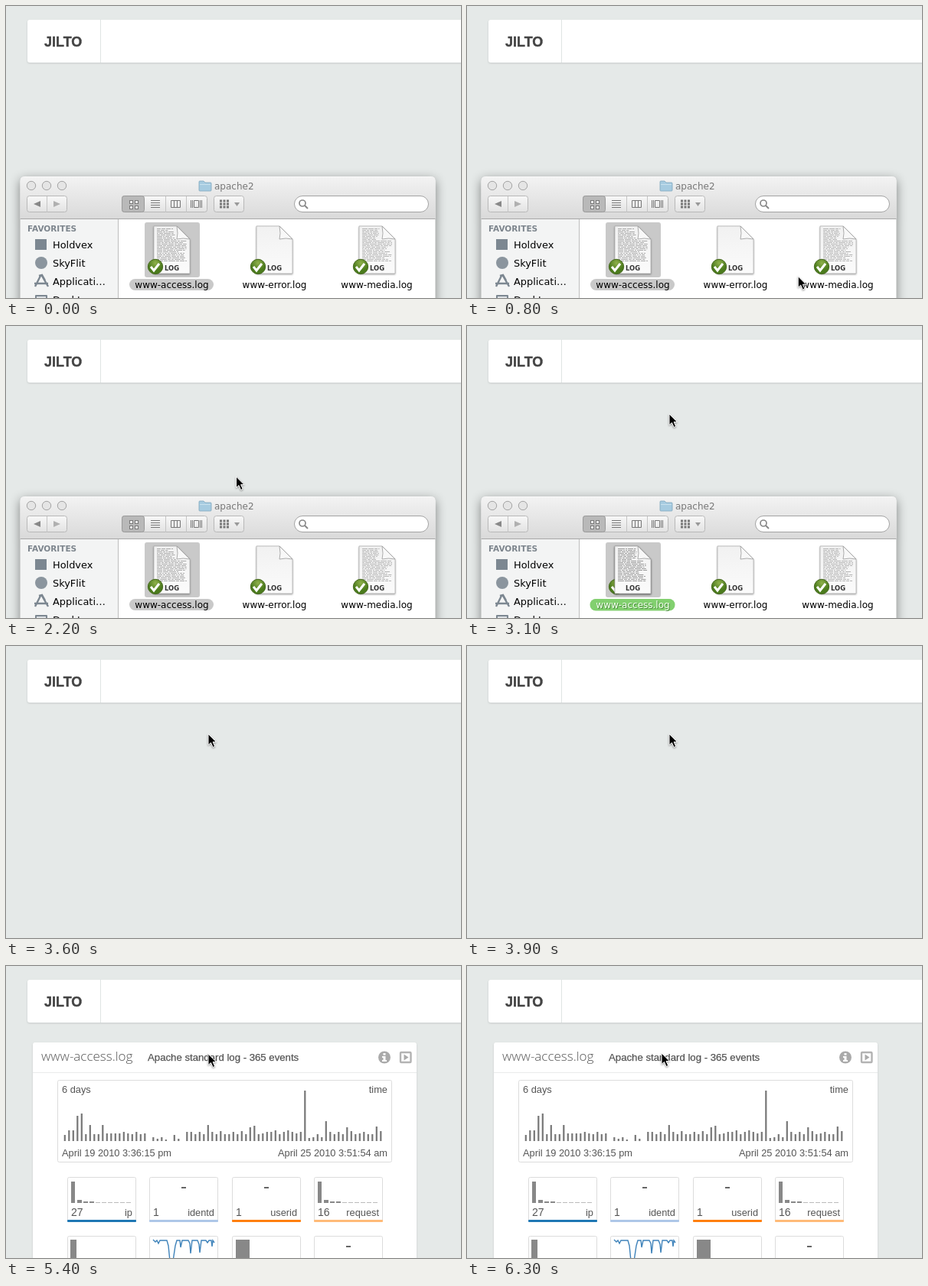
These frames come from a looping animation (594x382 px, 6.4 s). An HTML page:

```html
<!DOCTYPE html>
<html lang="en">
<head>
<meta charset="utf-8">
<title>Log viewer</title>
<style>
html, body { margin: 0; width: 594px; height: 382px; overflow: hidden; background: #e5e9e8; }
svg { display: block; }
.ui { font: 12px "DejaVu Sans", sans-serif; fill: #000; }
.side { font-size: 12.9px; }
.web { font: 12.8px "Liberation Sans", Arial, sans-serif; fill: #555; }
.end { text-anchor: end; }
.mid { text-anchor: middle; }
.card { filter: drop-shadow(0 1px 1px rgba(0,0,0,.13)); }
.page { filter: drop-shadow(0 1px 1px rgba(0,0,0,.35)); }
#finder { filter: drop-shadow(0 4px 7px rgba(0,0,0,.45)); }
#cursor { filter: drop-shadow(0 1px 1px rgba(0,0,0,.4)); }
</style>
</head>
<body>
<svg id="stage" width="594" height="382" viewBox="0 0 594 382">
  <defs>
    <linearGradient id="chrome" x2="0" y2="1"><stop stop-color="#f3f3f3"/><stop offset="1" stop-color="#d9d9d9"/></linearGradient>
    <linearGradient id="button" x2="0" y2="1"><stop stop-color="#f8f8f8"/><stop offset="1" stop-color="#e2e2e2"/></linearGradient>
    <linearGradient id="paper" x2="0" y2="1"><stop stop-color="#f1f1f1"/><stop offset="1" stop-color="#fbfbfb"/></linearGradient>
    <radialGradient id="badge" cy=".25"><stop stop-color="#8fb04b"/><stop offset="1" stop-color="#4b7b1d"/></radialGradient>
  </defs>
</svg>
<script>
const stage = document.getElementById('stage');
const $ = id => document.getElementById(id);

const rect = (x, y, w, h, fill, extra = '') =>
  `<rect x="${x}" y="${y}" width="${w}" height="${h}" fill="${fill}" ${extra}/>`;
const path = (d, fill, extra = '') => `<path d="${d}" fill="${fill}" ${extra}/>`;
const line = (d, color, width = 1, extra = '') =>
  path(d, 'none', `stroke="${color}" stroke-width="${width}" ${extra}`);
const circle = (x, y, r, fill, extra = '') => `<circle cx="${x}" cy="${y}" r="${r}" fill="${fill}" ${extra}/>`;
const text = (x, y, s, cls, extra = '') => `<text x="${x}" y="${y}" class="${cls}" ${extra}>${s}</text>`;
const group = (id, body, extra = '') => `<g id="${id}" ${extra}>${body}</g>`;

let seed = 918273;
const random = () => (seed = seed * 16807 % 2147483647) / 2147483647;

// Page header
const header = rect(28, 18, 580, 56, '#fff', 'rx="3" class="card"') +
  line('M123.5 18V74', '#dfe4e3') +
  text(50, 53, 'JILTO', 'web', 'style="font-size:18px;font-weight:bold;fill:#444" stroke="#444" stroke-width=".4"');

// File window
function page(x, ink) {
  let s = path(`M${x} 288h30l17 17v45h-47z`, 'url(#paper)', 'class="page" stroke="#aaa" stroke-width=".7"');
  for (let y = 291.5; ink && y < 335; y += 2) {
    const width = (y < 306 ? 25 : 39) - random() * random() * 14;
    const words = Array.from({ length: 6 }, () => 2 + Math.round(random() * 7)).join(' 1 ');
    s += line(`M${x + 4} ${y}h${width}`, ink, 1, `stroke-dasharray="${words} 1"`);
  }
  s += path(`M${x + 30} 288q2 10 0 17q8-2 17 0z`, '#f8f8f8', 'stroke="#999" stroke-width=".8"');
  return s + text(x + 14, 345.5, 'LOG', 'ui', 'style="font-size:8.4px;font-weight:bold;fill:#333"');
}

const badge = x => circle(x, 341, 9.7, 'url(#badge)', 'stroke="#47691f"') +
  line(`M${x - 6} 341l4 5 7-9`, '#fff', 3);

function toolbar() {
  const box = (x, w) => rect(x + .5, 248.5, w, 21, 'url(#button)', 'rx="3" stroke="#b8b8b8"');
  let s = box(27, 52) + line('M53.5 249V270', '#c4c4c4') +
    path('M45 255v8l-9-4z', '#888') + path('M62 255v8l9-4z', '#b0b0b0') + box(151, 111);
  s += rect(151.5, 248.5, 29, 21, '#b9b9b9', 'rx="3" stroke="#999"') +
    line('M208.5 249V270M235.5 249V270', '#c4c4c4');
  for (const x of [161, 168]) for (const y of [254, 261])
    s += rect(x + .5, y + .5, 4, 4, '#eee', 'stroke="#777"');
  s += line('M189 254.5h12M189 257.5h12M189 260.5h12M189 263.5h12', '#777');
  s += line('M215.5 254.5h12v9h-12zM219.5 254v10M223.5 254v10', '#777');
  s += line('M241.5 254v10M243.5 254v10M253.5 254v10M255.5 254v10M245.5 254.5h6v9h-6z', '#777');
  s += box(271, 39);
  for (const y of [254, 258, 262]) s += line(`M279 ${y + 1}h12`, '#777', 3, 'stroke-dasharray="3 1.5"');
  s += path('M298 257h7l-3.5 5z', '#999');
  s += rect(376.5, 248.5, 175, 21, '#fff', 'rx="10.5" stroke="#a3a3a3"');
  return s + circle(387, 258, 4, 'none', 'stroke="#888" stroke-width="1.7"') + line('M390 261l4 4', '#888', 2);
}

function sidebar() {
  let s = rect(19, 279, 127, 110, '#f3f4f4') + line('M146.5 279V390', '#bdbdbd') +
    text(28, 295, 'FAVORITES', 'ui', 'style="font-size:10.5px;font-weight:bold;fill:#7d858d"');
  s += rect(38, 305, 15, 14, '#7c8791') + circle(46, 336, 8, '#8b959e');
  s += line('M38 367l7-14M47 353l8 14M37 363h18M43 353l4-1 4 7', '#7c8791', 2.4);
  s += rect(38, 378, 16, 10, '#7c8791', 'rx="1"') + rect(40, 380, 12, 8, '#dce0e4');
  ['Holdvex', 'SkyFlit', 'Applicati…', 'Desktop'].forEach((name, i) =>
    s += text(61, 317 + i * 24, name, 'ui side'));
  return s;
}

// The picked file's drag image, lying over its icon
const dragged = page(193, '#999') + rect(160.5, 357, 111, 15.5, '#82d06f', 'rx="7.5"') +
  text(217.5, 370, 'www-access.log', 'ui mid', 'style="fill:#4d8a40"') +
  text(216.5, 369, 'www-access.log', 'ui mid', 'style="fill:#f4fff0"');

function finder() {
  let s = path('M18.6 390V229q0-6 6-6H554.5q6 0 6 6V390z', '#fff') +
    path('M18.6 279V229q0-6 6-6H554.5q6 0 6 6v50z', 'url(#chrome)') +
    line('M24 223.5H555', '#fafafa') + line('M18.6 278.5H560.5', '#a8a8a8');
  for (const x of [33, 53, 73]) s += circle(x, 235, 5.7, '#e5e5e5', 'stroke="#a4a4a4"');
  s += path('M252 230q0-1 1-1h5l2 2h7q1 0 1 1v9q0 1-1 1h-14q-1 0-1-1z', '#a6cbe0', 'stroke="#7fa6bd" stroke-width=".8"');
  s += line('M253 233.5h14', '#c9e1ee') + text(272, 240, 'apache2', 'ui', 'style="fill:#777"');
  s += toolbar() + sidebar();
  s += rect(181, 283, 72, 72, '#c9c9c9', 'rx="3"') + rect(161, 357, 110, 15, '#c9c9c9', 'rx="7.5"');
  s += page(193, '#aaa') + page(327) + page(461, '#b4b4b4') + badge(195) + badge(329) + badge(463);
  return s + text(216.5, 369, 'www-access.log', 'ui mid') +
    text(350.5, 369, 'www-error.log', 'ui mid') + text(484, 369, 'www-media.log', 'ui mid') +
    group('dragged', dragged);
}

// Report panel
const events = [8, 14, 14, 33, 36, 9, 21, 9, 9, 21, 10, 10, 10, 10, 12, 10, 9, 12, 9, 10,
  0, 5, 3, 5, 2, 0, 8, 3, 0, 12, 12, 9, 12, 9, 21, 12, 9, 13, 9, 9,
  12, 9, 13, 9, 18, 20, 9, 10, 12, 12, 14, 9, 12, 14, 12, 10, 12, 66, 4, 5,
  9, 5, 26, 12, 9, 12, 9, 18, 13, 9, 10, 12, 9, 9, 19, 13];
const columns = [80, 187, 295, 402];
const fields = [['27', 'ip', '#1f77b4'], ['1', 'identd', '#aec7e8'], ['1', 'userid', '#ff7f0e'], ['16', 'request', '#ffbb78']];

const frame = (x, y, w, h) => rect(x + .5, y + .5, w, h, '#fff', 'rx="2" stroke="#dcdcdc"');
const dash = (x, y) => rect(x + 42, y, 6, 2, '#666');
const histogram = x => [28, 4, 2, 2, 1, 1, 1, 1, 1, 1].map((h, i) =>
  rect(x + 5 + i * 8, 310 - h, i ? 6 : 5, h, i > 3 ? '#bbb' : '#888')).join('');

function panel() {
  let s = rect(35, 100, 501, 300, '#fff', 'rx="3" class="card"') + line('M35 139.5H536', '#e9ebeb');
  s += frame(67, 149, 436, 107) + text(73, 166, '6 days', 'web') + text(498, 166, 'time', 'web end') +
    text(73, 249, 'April 19 2010 3:36:15 pm', 'web') + text(498, 249, 'April 25 2010 3:51:54 am', 'web end');
  events.forEach((h, i) => s += rect(75.7 + i * 5.5, 229 - h, 2.2, h, '#777'));
  columns.forEach((x, i) => {
    const [count, name, color] = fields[i];
    s += frame(x, 276, 89, 58) + rect(x, 332, 90, 3, color, 'rx="1"') + frame(x, 353, 89, 58) +
      text(x + 5, 327, count, 'web', 'style="font-size:14px"') + text(x + 85, 327, name, 'web end');
    s += i % 3 ? dash(x, 289) : histogram(x);
  });
  s += rect(84, 358, 8, 40, '#888') + rect(300, 358, 18, 40, '#888') + dash(402, 366);
  s += line('M192 358l3 3 2-2 2 4 2-4h9l2 7 2 20h4l3-20 2-7h4l1 9 2-9h8l2 4 1 13 2-17h7l2 5 1 11 2-16h6l2 3 2-3h3l1 8 1-8 2 3', '#3f83ba', 1.4);
  s += text(204, 124, 'Apache standard log - 365 events', 'web', 'id="title" style="font-size:13.2px" stroke="#555" stroke-width=".25"');
  const details = text(46, 124, 'www-access.log', 'web', 'style="font:300 17px \'Open Sans\',sans-serif"') +
    circle(494, 119.5, 8, '#aaa') + rect(492.5, 114, 3, 2.6, '#fff') + path('M491 118h4.5v5h1.5v2h-6v-2h1.5v-3h-1.5z', '#fff') +
    rect(515, 113, 13.5, 13, '#fff', 'rx="1" stroke="#b3b3b3" stroke-width="2.4"') + path('M519.5 115.5v8l6-4z', '#aaa');
  return s + group('details', details);
}

stage.innerHTML += header + group('panel', panel()) + group('finder', finder()) +
  group('cursor', path('M.5 0V14.5L4 11.5 6.6 17.5 9.2 16.3 6.6 10.6H11Z', '#000', 'stroke="#fff" stroke-linejoin="round"'));

// Pointer stops: time, x, y
const stops = [[300, 600, 380], [1400, 210.5, 319], [1700, 210.5, 319], [2200, 300, 197],
  [2600, 263.5, 115], [6000, 263.5, 115], [6300, 253.5, 114]];

function pointer(t) {
  const next = stops.findIndex(stop => t < stop[0]);
  if (next === 0) return [600, 390];
  if (next < 0) return stops[stops.length - 1].slice(1);
  const [t0, x0, y0] = stops[next - 1], [t1, x1, y1] = stops[next];
  const k = (t - t0) / (t1 - t0), e = k * k * (3 - 2 * k);
  return [x0 + (x1 - x0) * e, y0 + (y1 - y0) * e];
}

const ramp = (t, from, to) => Math.min(1, Math.max(0, (t - from) / (to - from)));
const show = (id, opacity) => {
  $(id).style.display = opacity ? '' : 'none';
  $(id).style.opacity = opacity;
};

function draw(now) {
  const t = Math.floor(now % 6400 / 100) * 100;
  show('finder', 1 - ramp(t, 3100, 3500));
  show('dragged', t >= 2400 ? 1 : 0);
  show('panel', t >= 4900 ? 1 : 0);
  show('details', ramp(t, 5200, 5400));
  $('title').setAttribute('x', t < 5300 ? 204 : 185);
  $('cursor').setAttribute('transform', `translate(${pointer(t)})`);
}

const start = performance.now();
function tick() {
  draw(performance.now() - start);
  requestAnimationFrame(tick);
}
tick();
</script>
</body>
</html>
```
